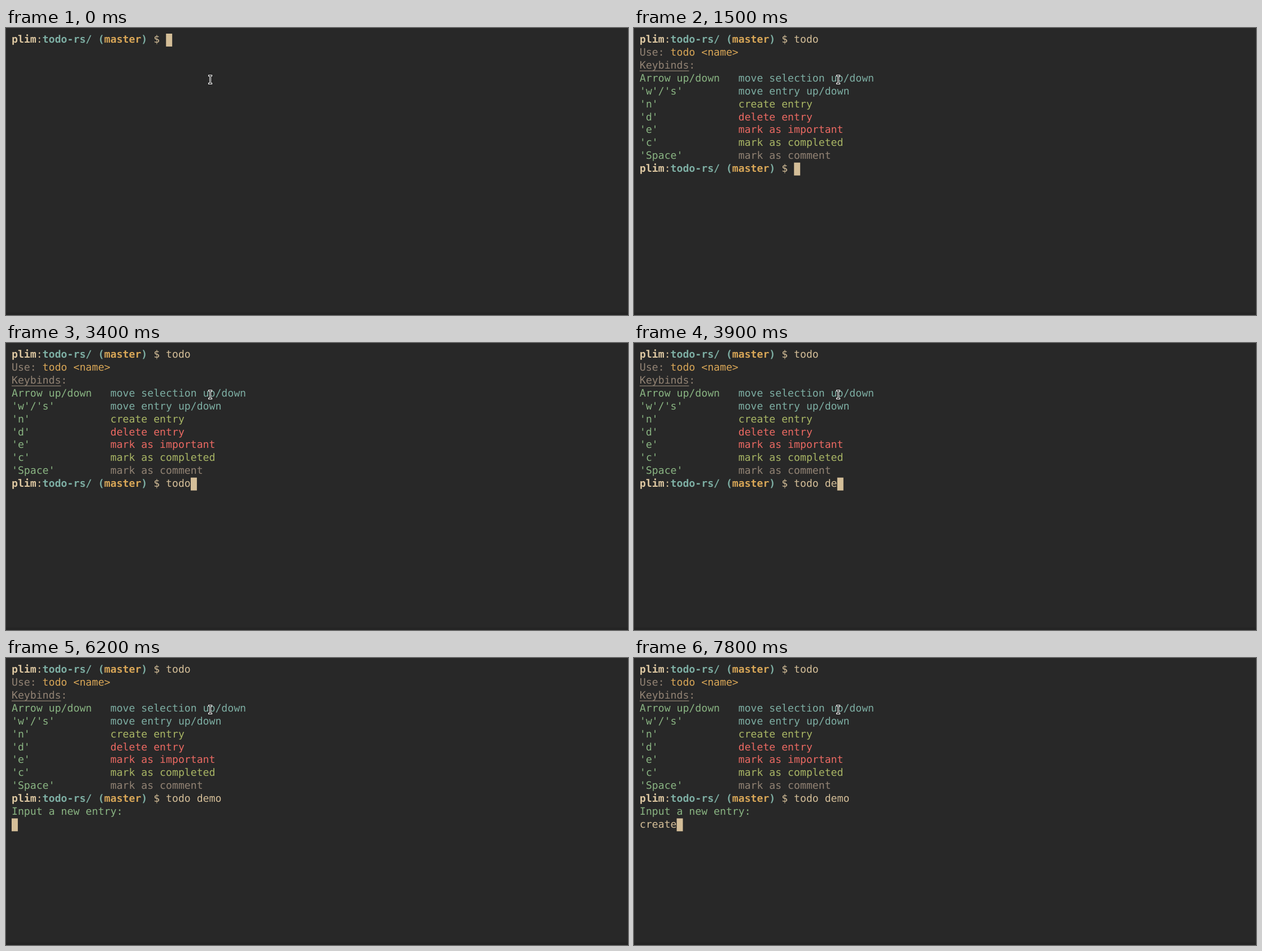
These frames come from a looping animation (1101 px wide and 509 px high, 8000 ms). An HTML page:

```html
<!DOCTYPE html>
<html lang="en">
<head>
<meta charset="utf-8">
<title>Terminal todo list</title>
<style>
  html, body { margin: 0; width: 100%; height: 100%; overflow: hidden; background: #282828; }
  svg { display: block; }
  text {
    font: 18.155px "DejaVu Sans Mono", monospace;
    white-space: pre;
    text-rendering: geometricPrecision;
    fill: #d4be98;
  }
  .bold { font-weight: bold; }
  .bright { fill: #ddc7a1; }
  .gray { fill: #928374; }
  .yellow { fill: #d8a657; }
  .aqua { fill: #89b482; }
  .blue { fill: #7daea3; }
  .green { fill: #a9b665; }
  .red { fill: #ea6962; }
</style>
</head>
<body>
<svg width="1101" height="509" viewBox="0 0 1101 509">
  <rect width="1101" height="509" fill="#282828"/>
  <rect y="504.5" width="1101" height="4.5" fill="#242424"/>
  <g id="screen"></g>
  <rect id="underline" x="10" y="75.5" width="87.4" height="1.2" fill="#928374"/>
  <rect id="cursor" width="10.93" height="22.87" fill="#d4be98"/>
  <g id="pointer" fill="none">
    <path d="M358 84.5h7M361.5 84.5v14M358 98.5h7" stroke="#fff" stroke-width="3"/>
    <path d="M359 84.5h5M361.5 84.5v14M359 98.5h5" stroke="#000" stroke-width="1"/>
  </g>
</svg>
<script>
const LOOP = 8000, LEFT = 10, TOP = 10, CELL = 10.93, ROW = 22.87, BASELINE = 16.4;
const $ = id => document.getElementById(id);

function make(tag, parent, attrs) {
  const el = document.createElementNS("http://www.w3.org/2000/svg", tag);
  for (const key in attrs) el.setAttribute(key, attrs[key]);
  return parent.appendChild(el);
}

// Each segment is [classes, text]; returns the last tspan for later typing.
function line(row, ...segments) {
  const text = make("text", $("screen"), { x: LEFT, y: TOP + BASELINE + row * ROW });
  let span;
  for (const [style, content] of segments) {
    span = make("tspan", text, { class: style });
    span.textContent = content;
  }
  return span;
}

const prompt = row => line(row,
  ["bold bright", "plim"], ["", ":"], ["bold blue", "todo-rs/ ("],
  ["bold yellow", "master"], ["bold blue", ")"], ["", " $ "], ["", ""]);
const help = (row, keys, color, action) =>
  line(row, ["aqua", keys.padEnd(16)], [color, action]);

const first = prompt(0);
const output = [
  line(1, ["gray", "Use: "], ["yellow", "todo <name>"]),
  line(2, ["gray", "Keybinds:"]),
  help(3, "Arrow up/down", "blue", "move selection up/down"),
  help(4, "'w'/'s'", "blue", "move entry up/down"),
  help(5, "'n'", "green", "create entry"),
  help(6, "'d'", "red", "delete entry"),
  help(7, "'e'", "red", "mark as important"),
  help(8, "'c'", "green", "mark as completed"),
  help(9, "'Space'", "gray", "mark as comment")
].map(span => span.parentNode);
const second = prompt(10);
output.push(second.parentNode, $("underline"));
const heading = line(11, ["bold aqua", "demo:"]).parentNode;
const question = line(11, ["aqua", "Input a new entry:"]).parentNode;
const entry = line(12, ["", ""]);

// Keystroke times, one per character
const typing = [
  [first, "todo", [500, 800, 1000, 1100]],
  [second, "todo demo", [3000, 3200, 3300, 3400, 3600, 3800, 3900, 4100, 4300]],
  [entry, "create", [7000, 7300, 7400, 7500, 7700, 7800]]
];

const show = (el, on) => el.setAttribute("visibility", on ? "visible" : "hidden");

function draw(t) {
  const typed = typing.map(([span, word, times]) => {
    const count = times.filter(time => time <= t).length;
    span.textContent = word.slice(0, count);
    return count;
  });
  output.forEach(el => show(el, t >= 1500));
  show(heading, t >= 4700 && t < 6200);
  show(question, t >= 6200);

  const [row, col] = t < 1400 ? [0, 25 + typed[0]]
    : t < 1500 ? [1, 0]
    : t < 4700 ? [10, 25 + typed[1]]
    : [12, typed[2]];
  $("cursor").setAttribute("x", LEFT + col * CELL);
  $("cursor").setAttribute("y", TOP + row * ROW);
  show($("cursor"), t < 4700 || t >= 6200);
}

function tick() {
  draw(performance.now() % LOOP);
  requestAnimationFrame(tick);
}
tick();
</script>
</body>
</html>
```
